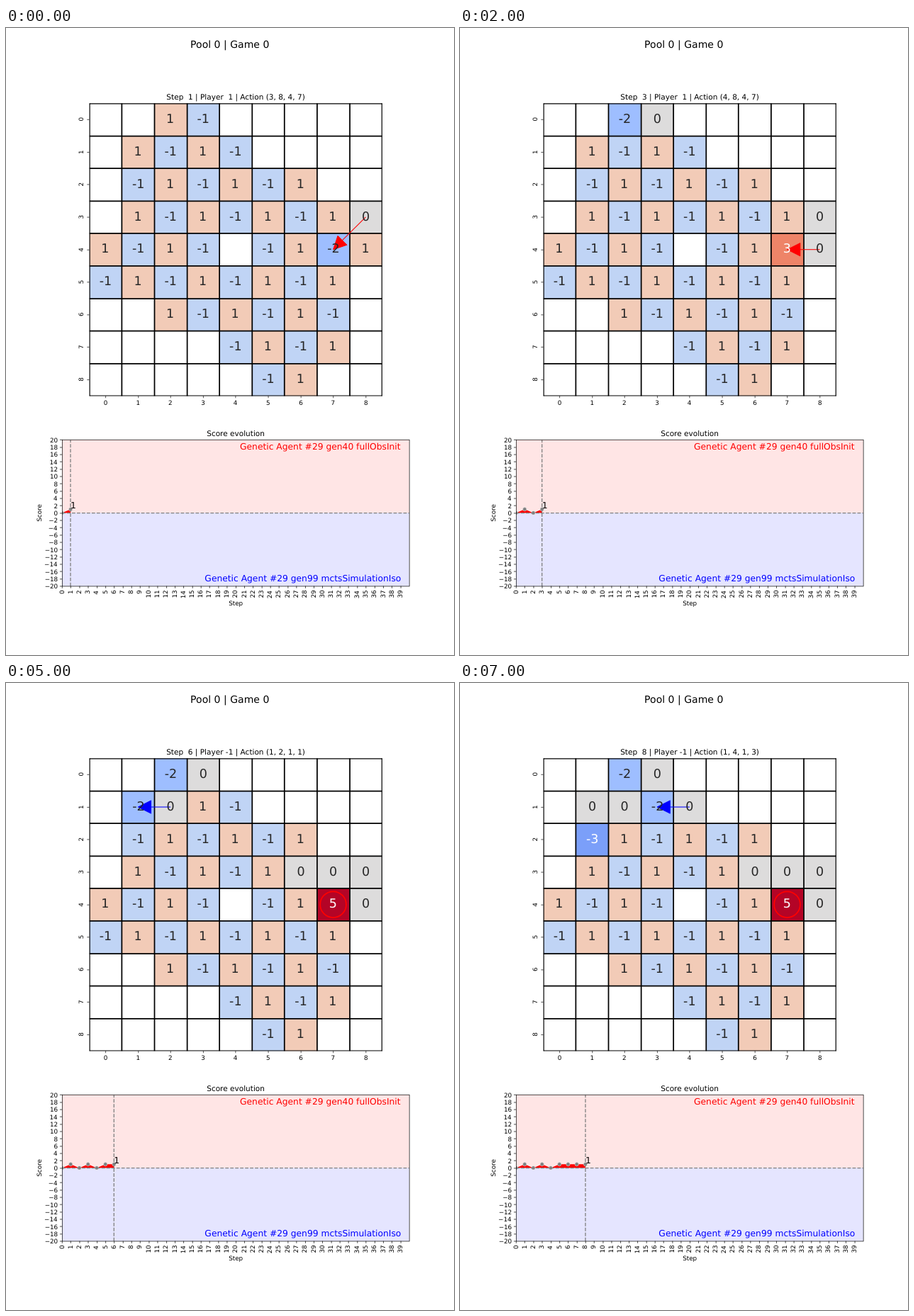
Write an HTML page with a canvas that moves like this. It is 632 by 885 pixels and loops after 8 s.

```html
<!DOCTYPE html>
<html lang="en">
<head>
<meta charset="utf-8">
<title>Pool 0 | Game 0</title>
<style>
  html, body { margin: 0; width: 100%; height: 100%; overflow: hidden; background: #fff; }
  canvas { display: block; }
</style>
</head>
<body>
<canvas id="stage" width="632" height="885"></canvas>
<script>
// The figure is laid out on a 1000 x 1400 sheet and scaled down to the stage.
const ctx = document.getElementById('stage').getContext('2d');
const STEP_MS = 1000;
const PT = 100 / 72;
const SMALL = 10 * PT, TITLE = 12 * PT, LABEL = 14 * PT, HEAD = 16 * PT, CELL_TEXT = 20 * PT;
const LEFT = 0, CENTER = 0.5, RIGHT = 1;
const ASCENT = 0.76, DESCENT = 0.208;
const MIDDLE = (ASCENT - DESCENT) / 2; // from the middle of a text box down to its baseline
const TICK = 3.5 * PT, TICK_PAD = 7 * PT;

const board = { x: 185.83, y: 168, cell: 72.593 };
const chart = { left: 125, right: 900, top: 919.33, bottom: 1246 };
const midX = (chart.left + chart.right) / 2;

const rowSpans = [[2, 3], [1, 4], [1, 6], [1, 8], [0, 8], [0, 7], [2, 7], [4, 7], [5, 6]];
const moves = [
  [3, 8, 4, 7], [0, 3, 0, 2], [4, 8, 4, 7], [3, 6, 4, 7],
  [3, 7, 4, 7], [1, 2, 1, 1], [1, 1, 2, 1], [1, 4, 1, 3]
];
const scores = [0, 1, 0, 1, 0, 1, 1, 1, 1];
const fills = {
  '-4': '#5977e3', '-3': '#7b9ff9', '-2': '#9ebeff', '-1': '#c0d4f5',
  0: '#dddcdc', 1: '#f2cbb7', 3: '#ee8468', 5: '#b40426'
};

const cellX = c => board.x + c * board.cell;
const cellY = r => board.y + r * board.cell;
const stepX = s => chart.left + s * (chart.right - chart.left) / 40;
const scoreY = v => (chart.top + chart.bottom) / 2 - v * (chart.bottom - chart.top) / 40;
const snap = v => Math.round(v) + 0.5;

// A move puts the whole tower on top of the other one and keeps its sign.
function boardAfter(step) {
  const cells = rowSpans.map(([from, to], r) => Array.from({ length: 9 }, (_, c) =>
    c < from || c > to || (r === 4 && c === 4) ? null : (r + c) % 2 ? -1 : 1));
  for (const [r1, c1, r2, c2] of moves.slice(0, step)) {
    const tower = cells[r1][c1];
    cells[r2][c2] = Math.sign(tower) * (Math.abs(tower) + Math.abs(cells[r2][c2]));
    cells[r1][c1] = 0;
  }
  return cells;
}

// Aligns the inked part of the text; a trace of rotation keeps baselines off the pixel grid.
function text(str, x, y, size, align = CENTER, color = '#000', vertical = false) {
  ctx.save();
  ctx.font = `${size}px "DejaVu Sans", sans-serif`;
  ctx.textRendering = 'geometricPrecision';
  ctx.fillStyle = color;
  const ink = ctx.measureText(str);
  const width = ink.actualBoundingBoxLeft + ink.actualBoundingBoxRight;
  ctx.translate(Math.round(x), Math.round(y));
  ctx.rotate((vertical ? -Math.PI / 2 : 0) + 0.0002);
  ctx.fillText(str, ink.actualBoundingBoxLeft - align * width, 0);
  ctx.restore();
}

function line(x1, y1, x2, y2, width = 0.8 * PT, color = '#000', dash = []) {
  ctx.beginPath();
  ctx.setLineDash(dash);
  ctx.lineWidth = width;
  ctx.strokeStyle = color;
  ctx.moveTo(x1, y1);
  ctx.lineTo(x2, y2);
  ctx.stroke();
  ctx.setLineDash([]);
}

function dashed(x1, y1, x2, y2) {
  const width = 1.5 * PT;
  line(x1, y1, x2, y2, width, '#808080', [3.7 * width, 1.6 * width]);
}

function circle(x, y, radius) {
  ctx.beginPath();
  ctx.arc(x, y, radius, 0, 2 * Math.PI);
}

function clipTo(x, y, width, height) {
  ctx.beginPath();
  ctx.rect(x, y, width, height);
  ctx.clip();
}

function drawArrow([r1, c1, r2, c2], color) {
  const x1 = cellX(c1 + 0.5), y1 = cellY(r1 + 0.5);
  const x2 = cellX(c2 + 0.5), y2 = cellY(r2 + 0.5);
  const length = Math.hypot(x2 - x1, y2 - y1);
  const head = 0.4 * board.cell;
  ctx.save();
  ctx.translate(x2, y2);
  ctx.rotate(Math.atan2(y2 - y1, x2 - x1));
  line(-length, 0, -head, 0, 1.2 * PT, color);
  ctx.beginPath();
  ctx.moveTo(0, 0);
  ctx.lineTo(-head, -head / 2);
  ctx.lineTo(-head, head / 2);
  ctx.closePath();
  ctx.fillStyle = color;
  ctx.lineWidth = PT;
  ctx.fill();
  ctx.stroke();
  ctx.restore();
}

function drawBoard(step) {
  const cells = boardAfter(step);
  const size = 9 * board.cell, bottom = board.y + size;
  const eachTower = draw => cells.forEach((row, r) => row.forEach((v, c) => v !== null && draw(v, r, c)));

  ctx.save();
  clipTo(Math.round(board.x), board.y, Math.ceil(size), Math.ceil(size));
  eachTower((v, r, c) => {
    ctx.fillStyle = fills[v];
    ctx.fillRect(cellX(c), cellY(r), board.cell + 1, board.cell + 1);
  });
  for (let i = 0; i <= 9; i++) {
    const x = snap(cellX(i)), y = snap(cellY(i));
    line(x, board.y, x, bottom + 1, 2 * PT);
    line(board.x, y, board.x + size + 1, y, 2 * PT);
  }
  ctx.restore();

  const player = step % 2 ? 1 : -1;
  const move = moves[step - 1];
  eachTower((v, r, c) => {
    if (v !== 5) return;
    circle(cellX(c + 0.5), cellY(r + 0.5), 0.4 * board.cell);
    ctx.strokeStyle = '#f00';
    ctx.lineWidth = 2 * PT;
    ctx.stroke();
  });
  drawArrow(move, player > 0 ? '#f00' : '#00f');
  eachTower((v, r, c) => text(v, cellX(c + 0.5), cellY(r + 0.5) + 0.27 * CELL_TEXT, CELL_TEXT,
    CENTER, Math.abs(v) > 2 ? '#fff' : '#262626'));

  for (let i = 0; i < 9; i++) {
    const x = cellX(i + 0.5), y = cellY(i + 0.5);
    line(snap(x), bottom, snap(x), bottom + TICK);
    line(board.x - TICK, snap(y), board.x, snap(y));
    text(i, x, bottom + TICK_PAD + ASCENT * SMALL, SMALL);
    text(i, board.x - TICK_PAD - DESCENT * SMALL, y, SMALL, CENTER, '#000', true);
  }
  const sign = String(player).padStart(2);
  text(`Step ${String(step).padStart(2)} | Player ${sign} | Action (${move.join(', ')})`,
    midX, board.y - 6 * PT, TITLE);
}

function drawChart(step) {
  const { left, right, top, bottom } = chart;
  const zero = scoreY(0);
  ctx.fillStyle = '#ffe5e5';
  ctx.fillRect(left, top, right - left, zero - top);
  ctx.fillStyle = '#e5e5ff';
  ctx.fillRect(left, zero, right - left, bottom - zero);

  ctx.save();
  clipTo(left, top, right - left, bottom - top);
  ctx.beginPath();
  ctx.moveTo(left, zero);
  for (let s = 0; s <= step; s++) ctx.lineTo(stepX(s), scoreY(scores[s]));
  ctx.lineTo(stepX(step), zero);
  ctx.fillStyle = '#f00';
  ctx.fill();
  for (let s = 0; s <= step; s++) {
    circle(stepX(s), scoreY(scores[s]), 3 * PT);
    ctx.fillStyle = '#808080';
    ctx.fill();
    ctx.strokeStyle = '#fff';
    ctx.lineWidth = 0.5 * PT;
    ctx.stroke();
  }
  const now = Math.round(stepX(step));
  dashed(left, Math.round(zero), right, Math.round(zero));
  dashed(now, bottom, now, top);
  ctx.restore();

  ctx.strokeStyle = '#000';
  ctx.lineWidth = 0.8 * PT;
  ctx.strokeRect(snap(left), snap(top), snap(right) - snap(left), snap(bottom) - snap(top));

  for (let s = 0; s < 40; s++) {
    const x = stepX(s);
    line(snap(x), bottom, snap(x), bottom + TICK);
    text(s, x + MIDDLE * SMALL, bottom + TICK_PAD, SMALL, RIGHT, '#000', true);
  }
  for (let v = -20; v <= 20; v += 2) {
    const y = scoreY(v);
    line(left - TICK, snap(y), left, snap(y));
    text(String(v).replace('-', '\u2212'), left - TICK_PAD, y + ASCENT / 2 * SMALL, SMALL, RIGHT);
  }
  text(scores[step], stepX(step + 0.1), scoreY(scores[step] + 0.2), LABEL, LEFT);
  const agent = (name, v, color) => text(name, stepX(39), scoreY(v) + MIDDLE * LABEL, LABEL, RIGHT, color);
  agent('Genetic Agent #29 gen40 fullObsInit', 18, '#f00');
  agent('Genetic Agent #29 gen99 mctsSimulationIso', -18, '#00f');
  text('Score evolution', midX, top - 6 * PT, TITLE);
  text('Step', midX, 1289, SMALL);
  text('Score', 78.5, zero, SMALL, CENTER, '#000', true);
}

function frame() {
  const step = Math.floor(performance.now() / STEP_MS) % moves.length + 1;
  ctx.setTransform(632 / 1000, 0, 0, 885 / 1400, 0, 0);
  ctx.fillStyle = '#fff';
  ctx.fillRect(0, 0, 1000, 1400);
  text('Pool 0 | Game 0', 500, 45, HEAD);
  drawBoard(step);
  drawChart(step);
  requestAnimationFrame(frame);
}
frame();
</script>
</body>
</html>
```
